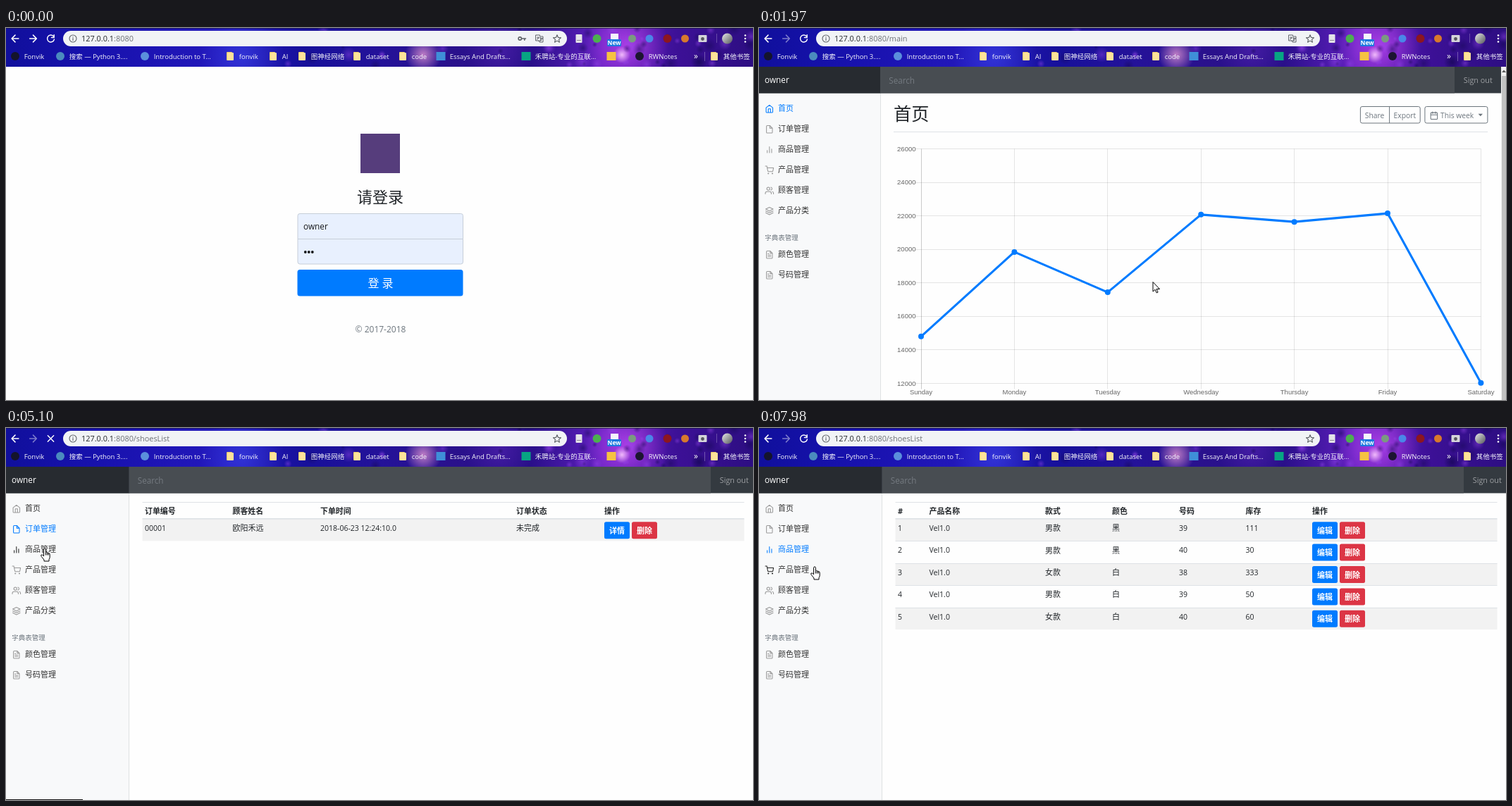
Animation, 1060 px wide and 528 px high, one loop 8000 ms. Source, as an HTML page with a canvas:

```html
<!DOCTYPE html>
<html lang="zh">
<head>
<meta charset="utf-8">
<title>Shop dashboard</title>
<style>
html, body { margin: 0; width: 100%; height: 100%; overflow: hidden; background: #fefefe; }
canvas { display: block; }
</style>
</head>
<body>
<canvas id="stage" width="1060" height="528"></canvas>
<script>
const ctx = document.getElementById('stage').getContext('2d');
const LOOP = 8000, STEP = 79.1;
const SANS = '"Open Sans", "Noto Sans CJK SC", "Noto Sans CJK", sans-serif';
const ARIAL = '"Liberation Sans", Arial, sans-serif';
const BLUE = '#007bff', GRAY = '#6c757d', INK = '#212529', RULE = '#dee2e6';
const USER = 'owner';

const ICONS = {
  home: 'M3 9l9-7 9 7v11a2 2 0 0 1-2 2H5a2 2 0 0 1-2-2z M9 22V12h6v10',
  file: 'M13 2H6a2 2 0 0 0-2 2v16a2 2 0 0 0 2 2h12a2 2 0 0 0 2-2V9z M13 2v7h7',
  bars: 'M18 20V10M12 20V4M6 20v-6',
  cart: 'M10 21a1 1 0 1 1-2 0a1 1 0 1 1 2 0M21 21a1 1 0 1 1-2 0a1 1 0 1 1 2 0M1 1h4l2.68 13.39a2 2 0 0 0 2 1.61h9.72a2 2 0 0 0 2-1.61L23 6H6',
  users: 'M17 21v-2a4 4 0 0 0-4-4H5a4 4 0 0 0-4 4v2M13 7a4 4 0 1 1-8 0a4 4 0 1 1 8 0M23 21v-2a4 4 0 0 0-3-3.87M16 3.13a4 4 0 0 1 0 7.75',
  layers: 'M12 2L2 7l10 5 10-5zM2 17l10 5 10-5M2 12l10 5 10-5',
  doc: 'M14 2H6a2 2 0 0 0-2 2v16a2 2 0 0 0 2 2h12a2 2 0 0 0 2-2V8zM14 2v6h6M16 13H8M16 17H8M10 9H8',
  calendar: 'M5 4h14a2 2 0 0 1 2 2v14a2 2 0 0 1-2 2H5a2 2 0 0 1-2-2V6a2 2 0 0 1 2-2zM16 2v4M8 2v4M3 10h18',
  back: 'M21 12H3M12 3L3 12l9 9',
  forward: 'M3 12h18M12 3l9 9-9 9',
  stop: 'M4 4l16 16M20 4L4 20',
  reload: 'M19 5.5A9.5 9.5 0 1 0 21.4 14M21 2v7h-7',
  info: 'M22 12a10 10 0 1 1-20 0a10 10 0 1 1 20 0M12 11v6M12 7v1',
  star: 'M12 2l3 7 7.5.6-5.7 5 1.8 7.4-6.6-4-6.6 4 1.8-7.4-5.7-5L9 9z',
  key: 'M11 12a4 4 0 1 1-8 0a4 4 0 1 1 8 0M11 12h11M19 12v4',
  translate: 'M2 2h11l3 16H2zM16 6h6v16H12l-2-4M5 10h6M8 7v2M5 15l5-5M15 11h6M16 18l4-7'
};
for (const name in ICONS) ICONS[name] = new Path2D(ICONS[name]);

const ARROW = new Path2D('M0 0V13.6L3.1 10.7L5.2 15.4L7.1 14.6L5.1 10H9.5Z');
const HAND = new Path2D('M-1.4 1.3Q-1.4 0 0 0Q1.4 0 1.4 1.3V5.6Q2.6 4.9 3.5 6Q4.8 5.5 5.5 6.8Q7.2 6.6 7.2 8.4V12Q7.2 14 6 15.4V18H-1V16L-4.6 11.6Q-5.9 9.8 -4.8 9Q-3.6 8.4 -1.4 10.8Z');

// time, x, y of the pointer
const TRACK = [
  [70, 943, 514], [820, 571, 376], [880, 570, 373], [1110, 562, 363], [1430, 559, 360],
  [2500, 559, 361], [3160, 62, 149], [3320, 60, 147], [4150, 60, 147], [4500, 55, 171],
  [6340, 55, 171], [6400, 72, 173], [6640, 79, 200], [6810, 80, 194], [7040, 79, 193],
  [7300, 79, 197], [8000, 79, 197]
];
const NAV = [
  ['home', '首页', 114], ['file', '订单管理', 143], ['bars', '商品管理', 172],
  ['cart', '产品管理', 201], ['users', '顾客管理', 230], ['layers', '产品分类', 259],
  ['doc', '颜色管理', 321], ['doc', '号码管理', 350]
];
const SALES = [15339, 21345, 18483, 24003, 23489, 24092, 12034];
const DAYS = ['Sunday', 'Monday', 'Tuesday', 'Wednesday', 'Thursday', 'Friday', 'Saturday'];
const SHOES = [
  ['男款', '黑', 39, 111], ['男款', '黑', 40, 30], ['女款', '白', 38, 333],
  ['男款', '白', 39, 50], ['女款', '白', 40, 60]
];
const BOOKMARKS = [
  ['dot', 13, 'Fonvik', '#14142c'], ['dot', 77, '搜索 — Python 3....', '#4b8bbe'],
  ['dot', 197, 'Introduction to T...', '#5b8fdc'], ['folder', 318, 'fonvik'],
  ['folder', 379, 'AI'], ['folder', 420, '图神经网络'], ['folder', 498, 'dataset'],
  ['folder', 563, 'code'], ['box', 617, 'Essays And Drafts...', '#3f8fd8'],
  ['box', 738, '禾聘站-专业的互联...', '#08a583'], ['box', 859, '', '#f5c242'],
  ['dot', 899, 'RWNotes', '#1c1530'], ['folder', 1005, '其他书签']
];

const within = (t, a, b) => t >= a && t < b;

function rect(x, y, w, h, fill) {
  ctx.fillStyle = fill;
  ctx.fillRect(x, y, w, h);
}

function rounded(x, y, w, h, r, fill, line) {
  ctx.beginPath();
  ctx.roundRect(x, y, w, h, r);
  if (fill) { ctx.fillStyle = fill; ctx.fill(); }
  if (line) { ctx.strokeStyle = line; ctx.lineWidth = 1; ctx.stroke(); }
}

function dot(x, y, r, fill) {
  ctx.beginPath();
  ctx.arc(x, y, r, 0, 7);
  ctx.fillStyle = fill;
  ctx.fill();
}

// y is the middle of the capitals; returns the width
function text(s, x, y, size, color, { align = 'left', weight = 400, family = SANS } = {}) {
  ctx.font = `${weight} ${size}px ${family}`;
  ctx.textAlign = align;
  ctx.fillStyle = color;
  ctx.fillText(s, x, y + size * 0.37);
  return ctx.measureText(s).width;
}

function icon(name, cx, cy, size, color, width = 2) {
  ctx.save();
  ctx.translate(cx - size / 2, cy - size / 2);
  ctx.scale(size / 24, size / 24);
  ctx.lineWidth = width;
  ctx.lineCap = ctx.lineJoin = 'round';
  ctx.strokeStyle = color;
  ctx.stroke(ICONS[name]);
  ctx.restore();
}

function glow(x, y, r, rgb, alpha) {
  const g = ctx.createRadialGradient(x, y, 0, x, y, r);
  g.addColorStop(0, `rgba(${rgb},${alpha})`);
  g.addColorStop(1, `rgba(${rgb},0)`);
  rect(x - r, y - r, 2 * r, 2 * r, g);
}

function theme() {
  ctx.save();
  ctx.beginPath();
  ctx.rect(0, 0, 1060, 55);
  ctx.clip();
  const g = ctx.createLinearGradient(0, 0, 1060, 0);
  ['#100f9c', '#1611ab', '#1d14b4', '#2419bc', '#17109a', '#241299', '#2a118c', '#280f88', '#6220c0', '#3c1096', '#2d0e82']
    .forEach((c, i) => g.addColorStop(i / 10, c));
  rect(0, 0, 1060, 55, g);
  glow(335, 40, 60, '60,70,235', 0.6);
  glow(592, 38, 26, '240,160,215', 0.75);
  glow(700, 30, 50, '95,40,190', 0.5);
  glow(880, 25, 60, '190,70,240', 0.8);
  glow(874, 38, 12, '250,200,255', 0.9);
  let seed = 7;
  const rnd = () => (seed = seed * 16807 % 2147483647) / 2147483647;
  for (let i = 0; i < 60; i++) {
    const x = 400 + rnd() * 660;
    glow(x, rnd() * 55, 3 + rnd() * 9, rnd() < 0.5 ? '150,70,235' : '18,6,80', 0.45);
  }
  rect(0, 0, 1060, 1, 'rgba(20,20,60,.6)');
  ctx.restore();
}

function folder(x, y) {
  rounded(x - 5, y - 6, 8, 12, 1, '#f3cf6d');
  rounded(x - 4, y - 5, 9, 11, 1, '#ffe29a');
}

function extensions() {
  rounded(808.5, 9, 9, 12, 1, '#e4e4e8');
  rect(810, 17, 6, 1, '#8a8a90');
  dot(838.5, 15, 6, '#4caf50');
  rect(858, 8, 11, 9, '#f4f4fa');
  rounded(853, 16, 20, 10, 1.5, '#1a78e0');
  text('New', 863, 21, 8.5, '#fff', { align: 'center', weight: 700 });
  dot(888.5, 15, 5.5, '#7a9a80');
  dot(913, 15, 5.5, '#4a86e8');
  dot(938.5, 15, 6, '#8c1620');
  dot(963.5, 15, 5.5, '#d8792c');
  rounded(982.5, 10, 12, 10, 1, '#d5d5da');
  dot(988.5, 15.5, 2.4, '#55555c');
  rect(1008, 8, 1, 13, 'rgba(255,255,255,.25)');
  const g = ctx.createLinearGradient(1016, 8, 1031, 22);
  g.addColorStop(0, '#e6e6e6');
  g.addColorStop(1, '#55585c');
  dot(1023.5, 15, 7.5, g);
  for (const y of [10.5, 15, 19.5]) dot(1049, y, 1.3, '#fff');
}

function browser(t) {
  theme();
  const loading = within(t, 1110, 1740) || within(t, 3400, 4010) || within(t, 4960, 5480);
  icon('back', 13, 15, 13, '#fff', 2.8);
  icon('forward', 38.5, 15, 13, t < 1270 ? '#fff' : 'rgba(255,255,255,.45)', 2.8);
  icon(loading ? 'stop' : 'reload', 63.5, 15, 12.5, '#fff', 2.8);
  rounded(81, 4, 715, 22, 11, '#f1f3f6');
  icon('info', 95, 15, 12, '#5f6368', 2.2);
  const path = t < 1270 ? '' : t < 3480 ? '/main' : t < 5030 ? '/orders' : '/shoesList';
  const hostWidth = text('127.0.0.1', 107, 15, 10.9, '#25282c');
  text(':8080' + path, 107 + hostWidth, 15, 10.9, '#6d7176');
  if (t < 1270) icon('key', 732, 15, 13, '#5f6368', 3);
  if (t < 1110 || within(t, 1740, 3400)) icon('translate', 757, 15, 12, '#5f6368', 2);
  icon('star', 782, 15, 12.5, '#5f6368', 2.2);
  extensions();

  for (const [kind, x, label, color] of BOOKMARKS) {
    if (kind === 'folder') folder(x, 40);
    else if (kind === 'dot') dot(x, 40, 6, color);
    else rect(x - 6.5, 34, 13, 12, color);
    text(label, x + 12.7, 40.5, 9.5, '#f4f4fb');
  }
  text('»', 979, 40, 12, '#fff', { align: 'center' });
  rect(991, 34, 1, 13, 'rgba(255,255,255,.3)');
}

function login(t) {
  rect(503, 150, 56, 56, '#563d7c');
  text('请登录', 531, 239.5, 22, INK, { align: 'center' });
  rounded(414, 263.5, 234.5, 36, [3, 3, 0, 0], '#e8f0fe', '#c6ced8');
  rounded(414, 299.5, 234.5, 35.5, [0, 0, 3, 3], '#e8f0fe', '#c6ced8');
  text(USER, 422, 282, 11.8, '#16181b');
  for (let i = 0; i < 3; i++) dot(424.8 + i * 5, 318, 1.9, '#16181b');
  rounded(413.5, 343, 235, 37.5, 3.5, t < 880 ? BLUE : '#0069d9');
  text('登 录', 531.5, 362.5, 16, '#fff', { align: 'center' });
  text('© 2017-2018', 531.5, 428, 12, GRAY, { align: 'center' });
}

function shell(t, active, scroll) {
  const left = scroll ? 172 : 174.5, signX = scroll ? 987 : 1000;
  const hover = within(t, 3160, 4300) ? 1 : within(t, 4650, 6640) ? 2 : t >= 6810 ? 3 : -1;
  rect(0, 92, left, 436, '#f8f9fa');
  rect(Math.floor(left), 92, 1, 436, '#dfe1e3');
  rect(0, 55, 1060, 37.5, '#343a40');
  rect(0, 55, left, 37.5, '#272b30');
  rect(left, 55, signX - left, 37.5, '#484d52');
  text(USER, 8, 74, 11.8, '#fff');
  text('Search', left + 12.3, 74.3, 11.7, '#747a80');
  text('Sign out', signX + 12.8, 74.3, 10.8, '#9c9fa2');

  NAV.forEach(([name, label, y], i) => {
    const on = i === active;
    icon(name, 14.8, y + 0.7, 12.6, on ? BLUE : i === hover ? '#222' : '#999');
    text(label, 27, y, 11, on ? BLUE : '#333');
  });
  text('字典表管理', 8.3, 297, 9.5, GRAY);
  if (scroll) {
    rect(1053, 55, 7, 473, '#f1f1f1');
    rect(1054, 68, 6, 460, '#c1c1c1');
    ctx.beginPath();
    ctx.moveTo(1054, 63);
    ctx.lineTo(1057, 59.5);
    ctx.lineTo(1060, 63);
    ctx.fillStyle = '#555';
    ctx.fill();
  }
}

function dashboard(scroll) {
  const left = scroll ? 191 : 193.5, dx = scroll ? -13.4 : 0;
  text('首页', left, 122, 25.2, INK);
  rect(left, 147, 1047.5 + dx - left, 1, RULE);
  rounded(866.8 + dx, 111.5, 84.8, 23.5, 2.5, null, GRAY);
  rect(907.5 + dx, 111.5, 1, 23.5, GRAY);
  rounded(958.3 + dx, 111.5, 89, 23.5, 2.5, null, GRAY);
  text('Share', 887 + dx, 124, 10.3, GRAY, { align: 'center' });
  text('Export', 929.7 + dx, 124, 10.3, GRAY, { align: 'center' });
  icon('calendar', 971.3 + dx, 124.3, 12.6, GRAY);
  text('This week', 980.5 + dx, 124, 10.3, GRAY);
  ctx.beginPath();
  ctx.moveTo(1034 + dx, 121.8);
  ctx.lineTo(1040.4 + dx, 121.8);
  ctx.lineTo(1037.2 + dx, 125.2);
  ctx.fillStyle = GRAY;
  ctx.fill();
}

function chart(t) {
  const p = Math.min(1, Math.max(0, (t - 1602) / 1000));
  const grow = 1 - (1 - p) ** 4;
  const px = i => 230 + i * 132.4;
  const py = v => 504.5 - (v - 12000) / 14000 * 333;
  for (let v = 12000; v <= 26000; v += 2000) {
    rect(222, Math.round(py(v) - 0.5), 802.4, 1, 'rgba(0,0,0,.1)');
    text(v, 222.5, py(v) - 0.5, 9.5, '#666', { align: 'right', family: ARIAL });
  }
  DAYS.forEach((day, i) => {
    rect(Math.round(px(i) - 0.5), 171.5, 1, 341, i ? 'rgba(0,0,0,.1)' : 'rgba(0,0,0,.2)');
    text(day, px(i), 516.3, 9.5, '#666', { align: 'center', family: ARIAL });
  });
  const points = SALES.map((v, i) => [px(i), py(12000 + (v - 12000) * grow)]);
  ctx.beginPath();
  points.forEach(q => ctx.lineTo(...q));
  ctx.strokeStyle = BLUE;
  ctx.lineWidth = 3.1;
  ctx.lineJoin = 'round';
  ctx.stroke();
  points.forEach(q => dot(...q, 4, BLUE));
}

function table(xs, heads, rows, action) {
  const pitch = 31.4, x0 = 193.5, w = 854;
  rect(x0, 105, w, 1, RULE);
  heads.forEach((h, i) => text(h, xs[i], 117.5, 10.9, INK, { weight: 700 }));
  rows.forEach((row, r) => {
    const y = 129 + r * pitch;
    if (r % 2 === 0) rect(x0, y, w, pitch, '#f2f2f2');
    if (r) rect(x0, Math.round(y), w, 1, RULE);
    row.forEach((cell, i) => text(cell, xs[i], y + 13.2, /[\u4e00-\u9fff]/.test(cell) ? 11 : 10.5, INK));
    const bx = xs[xs.length - 1];
    [[action, BLUE], ['删除', '#dc3545']].forEach(([label, color], k) => {
      rounded(bx + k * 39, y + 4.2, 36, 24, 2.5, color);
      text(label, bx + 18 + k * 39, y + 16.7, 11, '#fff', { align: 'center', weight: 700 });
    });
  });
  rect(x0, 128, w, 1.6, RULE);
}

function pointer(t) {
  if (t < 70) return;
  const i = Math.max(1, TRACK.findIndex(k => k[0] > t));
  const [t0, x0, y0] = TRACK[i - 1], [t1, x1, y1] = TRACK[i];
  const u = (t - t0) / (t1 - t0), e = u * u * (3 - 2 * u);
  const shape = within(t, 870, 1270) || t >= 4200 ? HAND : ARROW;
  ctx.save();
  ctx.translate(x0 + (x1 - x0) * e, y0 + (y1 - y0) * e);
  ctx.fillStyle = '#fff';
  ctx.strokeStyle = '#000';
  ctx.lineWidth = 1;
  ctx.lineJoin = 'round';
  ctx.fill(shape);
  ctx.stroke(shape);
  if (shape === HAND) {
    ctx.beginPath();
    for (const x of [1.4, 3.5, 5.4]) { ctx.moveTo(x, 6); ctx.lineTo(x, 9.5); }
    ctx.stroke();
  }
  ctx.restore();
}

function draw(t) {
  const held = t < 70 ? 0 : 70 + Math.floor((t - 70) / STEP) * STEP + 0.5;
  rect(0, 0, 1060, 528, '#fefefe');
  if (t < 1270) {
    login(t);
  } else if (t < 3710) {
    const ready = t >= 1660;
    shell(t, 0, ready);
    dashboard(ready);
    if (ready) chart(held);
  } else if (t < 5260) {
    shell(t, 1, false);
    table([197, 321.5, 446, 724, 849], ['订单编号', '顾客姓名', '下单时间', '订单状态', '操作'],
      [['00001', '欧阳禾远', '2018-06-23 12:24:10.0', '未完成']], '详情');
  } else {
    shell(t, 2, false);
    table([197, 241.5, 406, 501, 596, 690.5, 785], ['#', '产品名称', '款式', '颜色', '号码', '库存', '操作'],
      SHOES.map((s, i) => [i + 1, 'Vel1.0', ...s]), '编辑');
  }
  browser(t);
  const status = within(t, 3320, 3860) ? 97 : within(t, 4720, 5480) ? 109 : within(t, 7260, 7900) ? 107 : 0;
  rect(0, 527, status, 1, '#111');
  pointer(held);
}

const start = performance.now();
function tick() {
  draw((performance.now() - start) % LOOP);
  requestAnimationFrame(tick);
}
tick();
</script>
</body>
</html>
```
